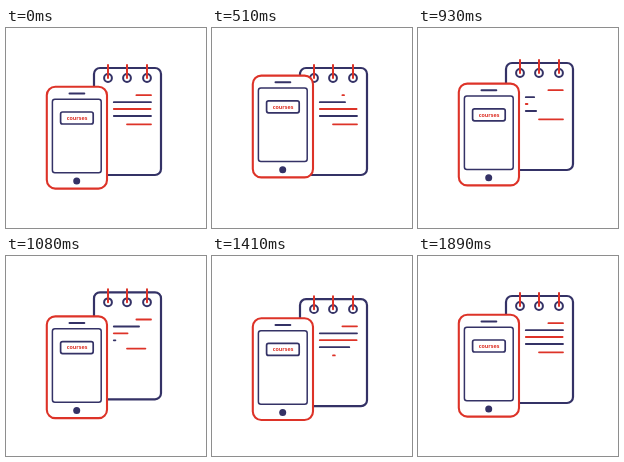
An HTML page that plays this animation: 200 px wide and 200 px high, repeating every 3630 ms.

```html
<!DOCTYPE html>
<html lang="en">
<head>
<meta charset="utf-8">
<title>Courses</title>
<style>
  html, body { margin: 0; width: 100%; height: 100%; overflow: hidden; background: #fff; }
  svg { display: block; width: 100vw; height: 100vh; }
  .navy, .red { fill: none; stroke-linecap: round; stroke-width: 2; }
  .navy { stroke: #343266; }
  .red { stroke: #dd3328; }
  .white { fill: #fff; }
  text { font: 700 5.4px "Open Sans", sans-serif; fill: #dd3328; text-anchor: middle; }
</style>
</head>
<body>
<svg viewBox="0 0 200 200">
  <g id="pad">
    <rect class="navy white" x="88" y="40" width="67" height="107" rx="6" style="stroke-width:2.2"/>
    <g id="rings"></g>
    <g id="lines"></g>
  </g>
  <g id="phone">
    <rect class="red white" x="40.8" y="58.8" width="60.2" height="101.8" rx="8.5" style="stroke-width:2.1"/>
    <rect class="navy" x="46.4" y="71.2" width="48.8" height="73.6" rx="2.5" style="stroke-width:1.5"/>
    <path class="navy" d="M63.5 65.5H78.3"/>
    <circle cx="70.7" cy="153" r="3.5" fill="#343266"/>
    <rect class="navy" x="54.6" y="84" width="32.6" height="12" rx="2" style="stroke-width:1.7"/>
    <text x="71" y="91.8">courses</text>
  </g>
</svg>
<script>
const LOOP = 3630, STEP = 30;
const $ = id => document.getElementById(id);

function add(parent, tag, attrs) {
  const el = document.createElementNS("http://www.w3.org/2000/svg", tag);
  for (const name in attrs) el.setAttribute(name, attrs[name]);
  return parent.appendChild(el);
}

for (const x of [102, 121, 141]) {
  add($("rings"), "circle", { class: "navy", cx: x, cy: 50, r: 3.9 });
  add($("rings"), "path", { class: "red", d: `M${x} 37V50` });
}

// left edge, right edge, y, colour, time when shortest, time to shrink or grow
const lines = [
  [130.4, 145, 67.2, "red", 500, 470],
  [107.8, 145, 74.2, "navy", 795, 470],
  [107.8, 144.6, 81, "red", 920, 400],
  [107.8, 145, 88, "navy", 1085, 470],
  [121, 145, 96.3, "red", 1380, 450]
].map(([left, right, y, color, mid, span]) => ({
  left, right, y, mid, span,
  el: add($("lines"), "path", { class: color, style: "stroke-width:1.8" })
}));

// [time, vertical offset]
const phoneTrack = [[0, 0], [570, -11.5], [1260, 4], [1890, 0]];
const padTrack = [[510, 0], [930, -5], [1530, 4], [1890, 0]];

const ease = p => (1 - Math.cos(Math.PI * Math.min(1, Math.max(0, p)))) / 2;

function valueAt(track, t) {
  let value = track[0][1];
  for (let i = 1; i < track.length; i++) {
    const [t0, v0] = track[i - 1], [t1, v1] = track[i];
    if (t >= t0) value = v0 + (v1 - v0) * ease((t - t0) / (t1 - t0));
  }
  return value;
}

function draw(t) {
  $("phone").setAttribute("transform", `translate(0 ${valueAt(phoneTrack, t)})`);
  $("pad").setAttribute("transform", `translate(0 ${valueAt(padTrack, t)})`);
  for (const { left, right, y, mid, span, el } of lines) {
    const length = 1.6 + (right - left - 1.6) * ease(Math.abs(t - mid) / span);
    el.setAttribute("d", `M${left} ${y}h${length}`);
  }
}

const start = performance.now();
function tick() {
  const t = (performance.now() - start) % LOOP;
  draw(Math.floor(t / STEP) * STEP);
  requestAnimationFrame(tick);
}
draw(0);
requestAnimationFrame(tick);
</script>
</body>
</html>
```
